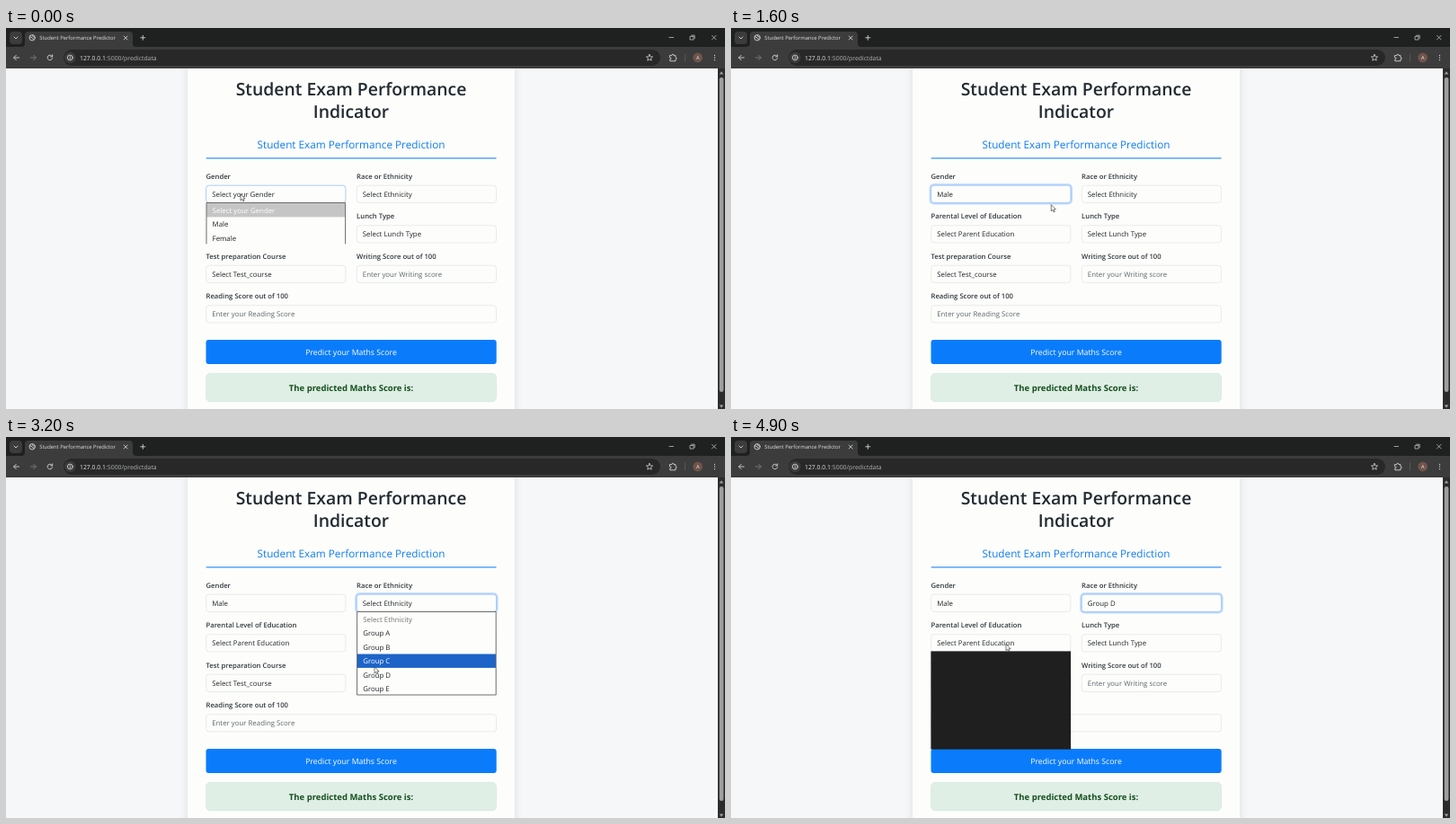
These frames come from a looping animation (800 by 424 pixels, 5000 ms). An HTML page:

```html
<!DOCTYPE html>
<html lang="en">
<head>
<meta charset="utf-8">
<title>Student Performance Predictor</title>
<style>
html, body { margin: 0; width: 100%; height: 100%; overflow: hidden; background: #f5f7f8; }
svg { display: block; width: 100vw; height: 100vh; }
text { font-family: "Open Sans", "Noto Sans", sans-serif; text-rendering: geometricPrecision; white-space: pre; }
.icon { fill: none; stroke: #d4d4d4; stroke-width: .9; stroke-linecap: round; stroke-linejoin: round; }
</style>
</head>
<body>
<svg id="stage" viewBox="0 0 800 424">
  <defs>
    <filter id="blur" x="-20%" y="-20%" width="140%" height="140%"><feGaussianBlur stdDeviation="5"/></filter>
  </defs>
  <rect width="800" height="424" fill="#f5f7f8"/>
  <rect x="202" y="20" width="364" height="440" fill="#000" opacity=".1" filter="url(#blur)"/>
  <rect x="202" y="45" width="364" height="379" fill="#fdfefb"/>
  <g id="page"></g>
  <g id="popup"></g>

  <rect x="792" y="45" width="8" height="379" fill="#2c2c2c"/>
  <rect x="793.8" y="55" width="4.6" height="350" rx="2.3" fill="#9f9f9f"/>
  <path d="M793.7 51.5h4.6l-2.3-3.2zM793.7 419.5h4.6l-2.3 3.2z" fill="#9f9f9f"/>

  <rect width="800" height="22" fill="#1f2020"/>
  <rect y="21" width="800" height="24" fill="#3c3c3c"/>
  <rect x="4" y="4" width="14" height="14" rx="4" fill="#3c3c3c"/>
  <path d="M17 21q4 0 4-4V8q0-4 4-4h112q4 0 4 4v9q0 4 4 4z" fill="#3c3c3c"/>
  <rect x="64" y="24" width="664" height="18" rx="9" fill="#282828"/>
  <circle cx="71.3" cy="33" r="6.2" fill="#3c3c3c"/>
  <g class="icon">
    <path d="M9 10l2 2 2-2M131.2 9l4 4m0-4l-4 4M149.8 10.8h5m-2.5-2.5v5"/>
    <circle cx="29.2" cy="10.8" r="3.2"/>
    <path d="M26.5 10q2-.6 2.4 1t2 1.2M29.5 8q-1 2 2 1.8"/>
    <path d="M738 10.5h4.6M761.4 9.4h3.6v3.6h-3.6zM762.6 8.2h3.6v3.6M785.5 8.3l4.6 4.6m0-4.6l-4.6 4.6" stroke-width=".7"/>
    <path d="M14.5 33H8.7m2.6-2.7L8.6 33l2.7 2.7"/>
    <path d="M27.5 33h5.8m-2.6-2.7l2.7 2.7-2.7 2.7" stroke="#7d7d7d"/>
    <path d="M51.4 31.6a2.8 2.8 0 1 0 .3 2M51.7 29.8v2.1h-2.1"/>
    <circle cx="71.3" cy="33" r="2.9"/>
    <path d="M71.3 32.8v1.6M71.3 31.4v.1"/>
    <path d="M716 29.4l1 2.4 2.6.2-2 1.7.6 2.5-2.2-1.3-2.2 1.3.6-2.5-2-1.7 2.6-.2z" stroke-width=".8"/>
    <path d="M738.8 30.6h2q0-1.4 1.1-1.4t1.1 1.4h2v2.2q1.2 0 1.2 1t-1.2 1v2h-6.2v-2q1.3 0 1.3-1t-1.3-1z"/>
    <path d="M755.5 29v8" stroke="#5c5c5c"/>
    <path d="M788.5 30.4v.1m0 2.5v.1m0 2.5v.1" stroke-width="1.3"/>
  </g>
  <circle cx="769.7" cy="33" r="5.4" fill="#70544b"/>
  <g id="bar"></g>
  <path id="cursor" d="M0 0v7.2l1.7-1.5 1.1 2.5 1.2-.5-1.1-2.5h2.2z" fill="#fff" stroke="#222" stroke-width=".6"/>
</svg>
<script>
const $ = id => document.getElementById(id);

function add(parent, tag, attrs, content) {
  const el = document.createElementNS("http://www.w3.org/2000/svg", tag);
  for (const k in attrs) el.setAttribute(k, attrs[k]);
  if (content) el.textContent = content;
  parent.append(el);
  return el;
}
const rect = (p, x, y, width, height, fill, more) => add(p, "rect", { x, y, width, height, fill, ...more });
const text = (p, x, y, size, fill, str, more) => add(p, "text", { x, y, "font-size": size, fill, ...more }, str);

const page = $("page"), popup = $("popup"), bar = $("bar");
const LEFT = 222.7, RIGHT = 390.3, COL = 155.2, WIDE = 322.8;
const mid = { "text-anchor": "middle" }, semi = { "font-weight": 600 };

text(bar, 37.3, 13, 5.85, "#e3e3e3", "Student Performance Predictor");
const url = text(bar, 82, 35.5, 6.87, "#e8e8e8", "127.0.0.1");
add(url, "tspan", { fill: "#b4b6b8" }, ":5000/predictdata");
text(bar, 769.7, 35.1, 5.6, "#eee", "A", mid);

text(page, 384, 75.4, 19.4, "#212a31", "Student Exam Performance", { ...mid, ...semi });
text(page, 384, 100.4, 19.4, "#212a31", "Indicator", { ...mid, ...semi });
text(page, 384, 134.4, 11.75, "#0d7bf5", "Student Exam Performance Prediction", mid);
rect(page, LEFT, 144.4, WIDE, 1.1, "#1a83fb");

function field(x, row, label, value, width = COL, ink = "#212529") {
  const y = 175.2 + 44.5 * row;
  text(page, x - .2, y - 7.4, 7.7, "#30373d", label, semi);
  const ring = rect(page, x - 1, y - 1, width + 2, 21.2, "none", { rx: 4, stroke: "#0d6efd", "stroke-width": 2.1 });
  const box = rect(page, x, y, width, 19.2, "#fdfefb", { rx: 3, "stroke-width": .7 });
  const value_ = text(page, x + 6.5, y + 12.5, 7.85, ink, value);
  const focus = (edge, glow) => {
    box.setAttribute("stroke", edge ? "#86b7fe" : "#dee2e6");
    ring.setAttribute("opacity", .27 * glow);
  };
  focus(0, 0);
  return { focus, set: s => value_.textContent = s };
}
const gender = field(LEFT, 0, "Gender", "");
const race = field(RIGHT, 0, "Race or Ethnicity", "");
field(LEFT, 1, "Parental Level of Education", "Select Parent Education");
field(RIGHT, 1, "Lunch Type", "Select Lunch Type");
field(LEFT, 2, "Test preparation Course", "Select Test_course");
field(RIGHT, 2, "Writing Score out of 100", "Enter your Writing score", COL, "#5d656c");
field(LEFT, 3, "Reading Score out of 100", "Enter your Reading Score", WIDE, "#5d656c");

rect(page, LEFT - .2, 347, WIDE + .4, 27, "#0a7cfb", { rx: 3 });
text(page, 384, 363.8, 8.74, "#fff", "Predict your Maths Score", mid);
rect(page, LEFT, 384.4, WIDE, 31.3, "#e0efe5", { rx: 4.5, stroke: "#cfe5d8", "stroke-width": .6 });
text(page, 384, 404.2, 9.5, "#14501f", "The predicted Maths Score is:", { ...mid, "font-weight": 700 });

// Option list; `hot` is the highlighted row.
function list(x, items, hot, closed) {
  const h = items.length * 15.5;
  rect(popup, x, 194.2, COL, h + (closed ? 1 : 0), "#fdfefb");
  items.forEach((s, i) => {
    const y = 195 + 15.5 * i;
    if (i == hot) rect(popup, x + .5, y, COL - 1, 15.4, i ? "#1e64c8" : "#c5c5c5");
    text(popup, x + 6.9, y + 10.9, 7.85, i == hot ? "#fff" : i ? "#212529" : "#737373", s);
  });
  const top = 194.5, end = top + h + (closed ? -.5 : -.7), r = x + COL - .3;
  add(popup, "path", {
    d: `M${x + .3} ${end}V${top}H${r}V${end}` + (closed ? "z" : ""),
    fill: "none", stroke: "#5e5e5e", "stroke-width": .9
  });
}
const dark = (x, y, h) => rect(popup, x - .3, y, COL + .5, h, "#1f1f1f");

const genders = ["Select your Gender", "Male", "Female"];
const groups = ["Select Ethnicity", ..."ABCDE"].map((s, i) => i ? "Group " + s : s);

// Pointer waypoints: time, x, y
const path = [
  [0, 261, 184.7], [500, 261, 184.7], [900, 260, 218], [1300, 260, 218],
  [1800, 408.5, 185], [2100, 408.5, 185], [2600, 411.5, 230.5], [2800, 411.5, 231],
  [3200, 410, 255.7], [3400, 410, 258.5], [4200, 410, 258.5], [4700, 306, 230.5], [5000, 306, 230.5]
];
function pointer(t) {
  const i = path.findIndex(p => p[0] > t), [t0, x0, y0] = path[i - 1], [t1, x1, y1] = path[i];
  const u = (t - t0) / (t1 - t0), e = u * u * (3 - 2 * u);
  return [x0 + (x1 - x0) * e, y0 + (y1 - y0) * e];
}

function draw(t) {
  const [x, y] = pointer(t);
  const hot = Math.max(0, Math.floor((y - 195) / 15.5));
  $("cursor").setAttribute("transform", `translate(${x} ${y})`);

  gender.set(genders[t < 1300 ? 0 : 1]);
  race.set(groups[t < 3500 ? 0 : 4]);
  gender.focus(t < 2000, t < 2000 ? Math.min(1, t / 200) : 0);
  race.focus(t >= 2000, t >= 2000 ? Math.min(1, (t - 1900) / 200) : 0);

  popup.replaceChildren();
  if (t < 1300) list(LEFT, genders, hot, false);
  else if (t >= 1900 && t < 2000) dark(RIGHT, 194, 94.3);
  else if (t >= 2000 && t < 3500) list(RIGHT, groups, hot, true);
  else if (t >= 4900) dark(LEFT, 238.4, 109.2);
}

let last = -1;
function tick() {
  const t = Math.floor(performance.now() % 5000 / 100) * 100;
  if (t != last) draw(last = t);
  requestAnimationFrame(tick);
}
tick();
</script>
</body>
</html>
```
